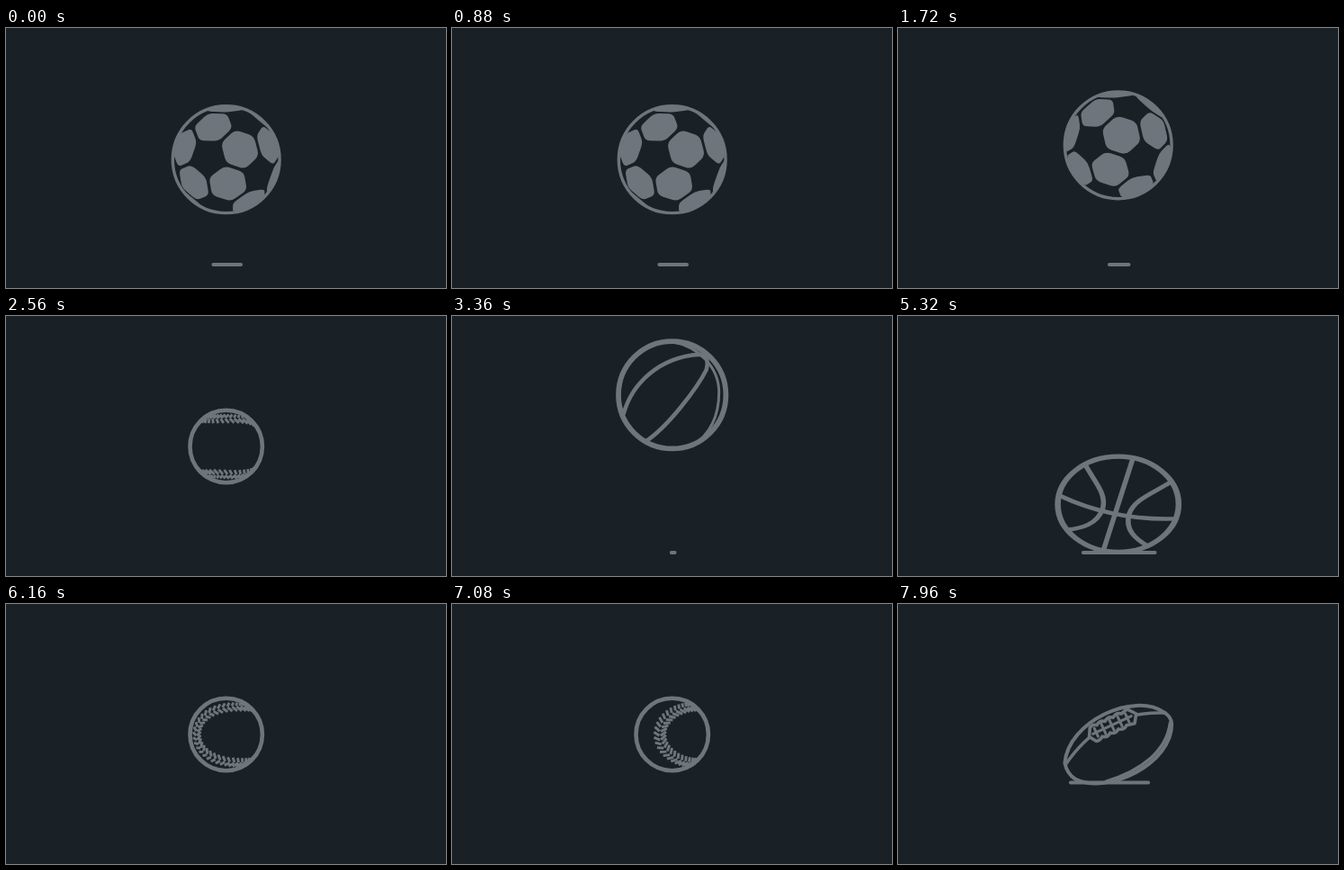
Recreate the animation shown at these times as an HTML page with a canvas. Size 489x289 px, loop 8000 ms.

```html
<!DOCTYPE html>
<html lang="en">
<head>
<meta charset="utf-8">
<title>Bouncing balls</title>
<style>
html, body { margin: 0; width: 100%; height: 100%; overflow: hidden; background: #192127; }
canvas { display: block; }
</style>
</head>
<body>
<canvas id="stage" width="489" height="289"></canvas>
<script>
const ctx = document.getElementById('stage').getContext('2d');
const DARK = '#192127', LIGHT = '#6e757c';
const LOOP = 8000, STEP = 40, CX = 244.7, TAU = Math.PI * 2;
const { sin, cos, abs, PI } = Math;

// ---- vectors: x right, y down, z towards the viewer ----
const dot = (a, b) => a[0] * b[0] + a[1] * b[1] + a[2] * b[2];
const mix = (...terms) => [0, 1, 2].map(i => terms.reduce((s, [k, v]) => s + k * v[i], 0));
const unit = v => mix([1 / Math.hypot(...v), v]);
const cross = (a, b) => [a[1] * b[2] - a[2] * b[1], a[2] * b[0] - a[0] * b[2], a[0] * b[1] - a[1] * b[0]];
const yaw = ([x, y, z], a) => [x * cos(a) + z * sin(a), y, z * cos(a) - x * sin(a)];

// ---- drawing helpers ----
function stroke(path, width) {
  ctx.lineWidth = width;
  ctx.stroke(path);
}

function circle(r) {
  const path = new Path2D();
  path.arc(0, 0, r, 0, TAU);
  return path;
}

function roundedPolygon(points, rounding) {
  const path = new Path2D();
  const between = (a, b, k) => [a[0] + (b[0] - a[0]) * k, a[1] + (b[1] - a[1]) * k];
  points.forEach((p, i) => {
    const n = points.length;
    path.lineTo(...between(p, points[(i + n - 1) % n], rounding));
    path.quadraticCurveTo(...p, ...between(p, points[(i + 1) % n], rounding));
  });
  path.closePath();
  return path;
}

function floorLine(x, y, width) {
  const path = new Path2D();
  path.moveTo(x - width / 2 + 2, y);
  path.lineTo(x + width / 2 - 2, y);
  stroke(path, 4);
}

function at(x, y, angle, draw, sx = 1, sy = 1) {
  ctx.save();
  ctx.translate(x, y);
  ctx.scale(sx, sy);
  ctx.rotate(angle);
  draw();
  ctx.restore();
}

// ---- bounce: parabola in the air, short squash on the floor ----
function bounce(t, { impact, period, contact, radius, top, squash }) {
  const turn = (t - impact) / period;
  const tau = (turn - Math.round(turn)) * period;
  const floor = 264.8, rest = floor - radius;
  let y, sx = 1;
  if (abs(tau) < contact) {
    sx = 1 + squash * (1 - (tau / contact) ** 4);
    y = floor - radius / sx;
  } else {
    const fall = (period / 2 - abs(tau)) / (period / 2 - contact);
    y = top + (rest - top) * fall * fall;
  }
  return { tau, y, sx };
}

function bouncing(t, motion, draw) {
  const { tau, y, sx } = bounce(t, motion);
  const drop = Math.max(0, y - 82);
  floorLine(CX + 1, 263, 6 + 0.28 * drop + 0.0026 * drop * drop);
  at(CX, y, 0, () => draw(tau), sx, 1 / sx);
}

// ---- soccer ball: the hexagons of a truncated icosahedron ----
const pole = unit([-0.35, -0.035, 0.936]);
const side = unit([0.904, -0.279, 0.325]);
const up = cross(pole, side);
const centers = [[37.38, 0], [79.19, 0], [100.81, 36], [142.62, 36]].flatMap(([polar, shift]) =>
  [0, 1, 2, 3, 4].map(k => {
    const p = polar * PI / 180, a = (shift + 72 * k) * PI / 180;
    return mix([cos(p), pole], [sin(p) * cos(a), side], [sin(p) * sin(a), up]);
  }));
const hexagons = centers.map(c => {
  const next = centers.find(o => abs(dot(o, c) - 0.745) < 0.05);
  const u = unit(mix([1, next], [-dot(next, c), c]));
  const v = cross(c, u);
  return [0, 1, 2, 3, 4, 5].map(k => {
    const a = (30 + 60 * k) * PI / 180;
    return unit(mix([1, c], [0.4 * cos(a), u], [0.4 * sin(a), v]));
  });
});
const SOCCER = { impact: 138, period: 880, contact: 24, radius: 61, top: 82, squash: 0.1 };

function soccer(t) {
  const phase = TAU * t / SOCCER.period;
  const angle = phase - 0.25 * sin(phase);
  bouncing(t, SOCCER, () => {
    ctx.save();
    ctx.clip(circle(61));
    hexagons.forEach((hexagon, i) => {
      if (yaw(centers[i], angle)[2] < -0.25) return;
      const points = hexagon.map(p => {
        const [x, y, z] = yaw(p, angle);
        const r = 61 / (z < 0 ? Math.hypot(x, y) : 1);
        return [x * r, y * r];
      });
      ctx.fill(roundedPolygon(points, 0.27));
    });
    ctx.restore();
    stroke(circle(59.4), 3.4);
  });
}

// ---- basketball ----
const BASKET = { impact: 4505, period: 808, contact: 50, radius: 62.5, top: 83.5, squash: 0.125 };
const frontSeams = new Path2D(
  'M0-60V60 M-58 4Q0 21 58 4' +
  'M-43-39C-30-22-14-10-13.5 9C-14 30-28 38-40 43' +
  'M43-39C30-22 14-10 13.5 9C14 30 28 38 40 43');
const loopSeam = new Path2D('M-54 21C-45-12-15-42 30-45Q42-45 38-28C28-8-5 36-30 52');
const edgeSeam = new Path2D('M0-59C30-54 52-30 52-3C52 20 45 42 22 57');

function basketball(t) {
  bouncing(t, BASKET, tau => {
    const front = abs(tau) < BASKET.period / 4;
    const spin = TAU * (front ? tau + 25 : t - 3360) / BASKET.period;
    at(0, 0, spin, () => {
      if (front) return stroke(frontSeams, 5);
      stroke(loopSeam, 4.5);
      stroke(edgeSeam, 3);
    });
    stroke(circle(59.7), 5.8);
  });
}

// ---- baseball: closed seam on the sphere with slanted stitches ----
function seamPoint(s) {
  const a = 0.88, b = 0.12;
  const x = a * cos(s) + b * cos(3 * s), y = a * sin(s) - b * sin(3 * s);
  return [-2 * Math.sqrt(a * b) * sin(2 * s), (x - y) / Math.SQRT2, (x + y) / Math.SQRT2];
}

function baseball(t) {
  const angle = TAU * (t - 6160) / 840 - 0.23, count = 66;
  at(CX, 145, 0, () => {
    const stitches = new Path2D();
    for (let i = 0; i < count; i++) {
      const s = TAU * i / count;
      const p = yaw(seamPoint(s), angle);
      if (p[2] < -0.05) continue;
      const along = unit(mix([1, yaw(seamPoint(s + 0.01), angle)], [-1, p]));
      const across = cross(p, along);
      for (const way of [-1, 1]) {
        const start = mix([1, p], [0.015 * way, across]);
        const end = unit(mix([1, p], [0.18 * way, across], [0.1, along]));
        stitches.moveTo(start[0] * 41, start[1] * 41);
        stitches.lineTo(end[0] * 41, end[1] * 41);
      }
    }
    ctx.lineCap = 'butt';
    stroke(stitches, 2.9);
    ctx.lineCap = 'round';
    stroke(circle(40.2), 4.6);
  });
}

// ---- american football, tipping over on the floor ----
const hull = new Path2D('M-63-6C-40-46 40-46 61-10Q66-2 63 5C45 45-35 47-60 15Q-66 6-63-6Z');
const seam = new Path2D('M-63-4Q0-42 62-9');
const shade = new Path2D('M-30 32C10 38 45 30 62 3');
const patch = new Path2D('M-26-21L-21-30Q-16-32-13-29Q-8-33-3-29Q2-33 7-29Q12-33 17-29L25-31 32-22 26-13 17-15' +
  'Q12-11 7-15Q2-11-3-15Q-8-11-13-15Q-16-12-21-13Z');
const laces = new Path2D('M-21-22H26M-17-27V-17M-8-28V-16M2-28V-16M12-28V-16M21-27V-17');

function football(t) {
  const u = (t - 7600) / 360;
  const tilt = (25 + 65 * (1 + cos(PI * u)) / 2) * PI / 180;
  const halfHeight = Math.hypot(64 * sin(tilt), 35.5 * cos(tilt));
  floorLine(235, 198.5, 25 + 72 * cos(tilt));
  at(245, 197.5 - halfHeight, -tilt, () => {
    stroke(seam, 3.5);
    stroke(shade, 3.5);
    ctx.fillStyle = DARK;
    ctx.fill(patch);
    stroke(patch, 3.6);
    stroke(laces, 3);
    stroke(hull, 4);
  });
}

const scenes = [[1760, soccer], [3040, baseball], [5920, basketball], [7600, baseball], [LOOP, football]];

function render(now) {
  const t = Math.floor((now % LOOP) / STEP) * STEP;
  ctx.fillStyle = DARK;
  ctx.fillRect(0, 0, 489, 289);
  ctx.fillStyle = ctx.strokeStyle = LIGHT;
  ctx.lineCap = ctx.lineJoin = 'round';
  scenes.find(([end]) => t < end)[1](t);
}

let begin;
function tick(now) {
  begin ??= now;
  render(Math.max(0, now - begin));
  requestAnimationFrame(tick);
}
render(0);
requestAnimationFrame(tick);
</script>
</body>
</html>
```
